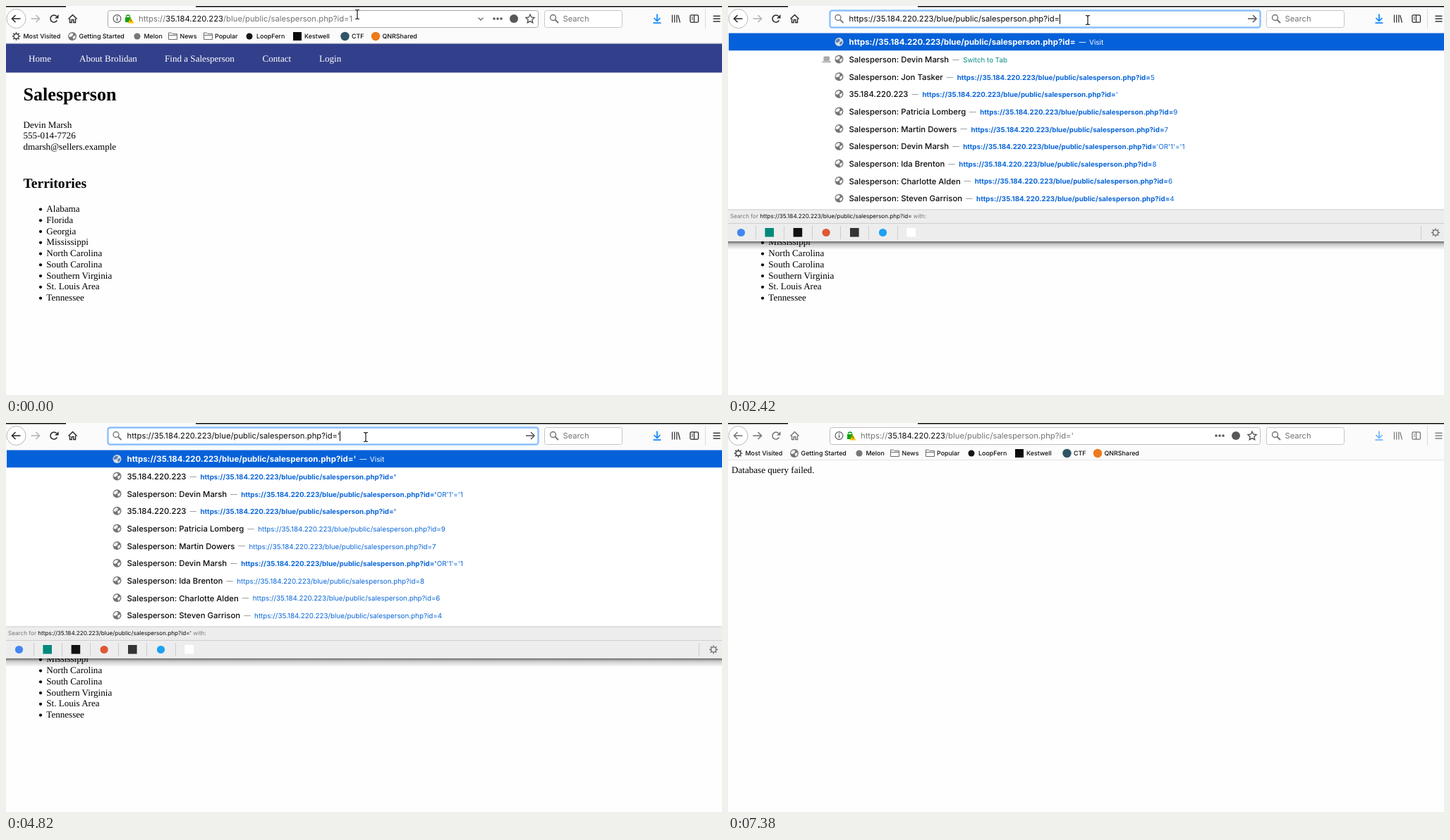
An HTML page with a canvas that plays this animation: 1015x552 px, repeating every 7.48 s.

```html
<!DOCTYPE html>
<html lang="en">
<head>
<meta charset="utf-8">
<title>Address bar</title>
<style>
html, body { margin: 0; width: 100%; height: 100%; overflow: hidden; background: #fefefe; }
canvas { display: block; width: 1015px; height: 552px; }
</style>
</head>
<body>
<canvas id="stage"></canvas>
<script>
const W = 1015, H = 552, LOOP = 7480;
const canvas = document.getElementById('stage');
const ctx = canvas.getContext('2d');
const dpr = window.devicePixelRatio || 1;
canvas.width = W * dpr;
canvas.height = H * dpr;

const SANS = 'Inter, "Open Sans", sans-serif';
const SERIF = '"Liberation Serif", "Times New Roman", serif';
const HOST = '35.184.220.223';
const PATH = '/blue/public/salesperson.php?id=';
const BASE = 'https://' + HOST + PATH;
const INK = '#2b2b2f', GREY = '#737373', LINK = '#0a66d8';
const SELLER = 'Devin Marsh';
const AREAS = ['Alabama', 'Florida', 'Georgia', 'Mississippi', 'North Carolina',
  'South Carolina', 'Southern Virginia', 'St. Louis Area', 'Tennessee'];
const INJECT = "'OR'1'='1";

// Each step changes part of the running state
const steps = [
  [0, { mode: 'view', q: '1', page: 'seller', hover: true, cur: [498, 12], popup: false, caret: false, selected: false, loading: false, active: true }],
  [150, { cur: [498, 16] }],
  [470, { cur: [502, 18] }],
  [620, { cur: [507, 19] }],
  [770, { cur: [510, 20] }],
  [920, { mode: 'focus', selected: true }],
  [1820, { selected: false, caret: true }],
  [2270, { mode: 'type', q: '' }],
  [2420, { popup: true }],
  [2720, { caret: false }],
  [3170, { q: '[', caret: true }],
  [3320, { q: "['" }],
  [3770, { q: '[', popup: false }],
  [3920, { popup: true }],
  [4070, { q: '', popup: false }],
  [4220, { popup: true }],
  [4520, { caret: false }],
  [4820, { q: "'", caret: true }],
  [5110, { popup: false }],
  [5290, { mode: 'load', caret: false, loading: true }],
  [5820, { mode: 'view', page: 'failed' }],
  [6050, { loading: false }],
  [6200, { hover: false, cur: [532, 58] }],
  [6350, { cur: [640, 176] }],
  [6500, { cur: [778, 326] }],
  [6650, { cur: [885, 438] }],
  [6790, { cur: [949, 504] }],
  [6940, { cur: null }],
  [7380, { active: false }]
];

function stateAt(t) {
  const s = {};
  for (const [at, patch] of steps) if (at <= t) Object.assign(s, patch);
  return s;
}

// Drawing helpers
function text(str, x, y, size, color, weight = 400, family = SANS) {
  ctx.font = `${weight} ${size}px ${family}`;
  ctx.fillStyle = color;
  ctx.fillText(str, x, y);
  return x + ctx.measureText(str).width;
}
function rect(x, y, w, h, color) {
  ctx.fillStyle = color;
  ctx.fillRect(x, y, w, h);
}
function box(x, y, w, h, r, fill, stroke, lw = 1) {
  ctx.beginPath();
  ctx.roundRect(x, y, w, h, r);
  if (fill) { ctx.fillStyle = fill; ctx.fill(); }
  if (stroke) { ctx.strokeStyle = stroke; ctx.lineWidth = lw; ctx.stroke(); }
}
function disc(x, y, r, color) {
  ctx.beginPath();
  ctx.arc(x, y, r, 0, 7);
  ctx.fillStyle = color;
  ctx.fill();
}
function ring(x, y, r, color, lw = 1, from = 0, to = Math.PI * 2) {
  ctx.beginPath();
  ctx.arc(x, y, r, from, to);
  ctx.strokeStyle = color;
  ctx.lineWidth = lw;
  ctx.stroke();
}
function path(pts, color, lw, closed) {
  ctx.beginPath();
  for (let i = 0; i < pts.length; i += 2) ctx.lineTo(pts[i], pts[i + 1]);
  if (closed) ctx.closePath();
  ctx.strokeStyle = color;
  ctx.lineWidth = lw;
  ctx.stroke();
}
function shape(pts, color) {
  ctx.beginPath();
  for (let i = 0; i < pts.length; i += 2) ctx.lineTo(pts[i], pts[i + 1]);
  ctx.fillStyle = color;
  ctx.fill();
}

// Icons
function arrow(x, y, dir, color, half = 6, lw = 1.6) {
  const tip = x + dir * half;
  path([x - dir * half, y, tip, y], color, lw);
  path([tip - dir * 5, y - 5, tip, y, tip - dir * 5, y + 5], color, lw);
}
function lens(x, y, color) {
  ring(x - 1.5, y - 1.5, 4, color, 1.4);
  path([x + 1.5, y + 1.5, x + 6, y + 6], color, 1.8);
}
function gear(x, y, r, color) {
  ring(x, y, r * 0.6, color, 1.4);
  for (let i = 0; i < 8; i++) {
    const c = Math.cos(i * Math.PI / 4), s = Math.sin(i * Math.PI / 4);
    path([x + c * r * 0.7, y + s * r * 0.7, x + c * r, y + s * r], color, 1.5);
  }
}
function globe(x, y, color = '#747477', land = '#f2f2f2') {
  disc(x, y, 6, color);
  shape([x - 4.5, y - 2.5, x - 1, y - 4.8, x + 1.5, y - 3.5, x + 0.5, y - 1, x - 2, y + 1, x - 5, y + 0.5], land);
  shape([x + 0.5, y + 0.5, x + 4.8, y - 1.5, x + 4, y + 2.5, x + 1.5, y + 4.6], land);
}
function folder(x, y) {
  path([x, y - 4.5, x + 4, y - 4.5, x + 5.5, y - 3, x + 12, y - 3, x + 12, y + 5, x, y + 5], '#6b6b6e', 1, true);
  path([x, y - 1, x + 12, y - 1], '#6b6b6e', 1);
}
function star(x, y, r, color) {
  const pts = [];
  for (let i = 0; i < 10; i++) {
    const a = i * Math.PI / 5 - Math.PI / 2, d = i % 2 ? r * 0.48 : r;
    pts.push(x + Math.cos(a) * d, y + Math.sin(a) * d);
  }
  path(pts, color, 1.3, true);
}
function home(x, y, color) {
  path([x - 6, y + 0.5, x, y - 5.5, x + 6, y + 0.5], color, 1.5);
  path([x - 4, y, x - 4, y + 5.5, x - 1.3, y + 5.5, x - 1.3, y + 1.5, x + 1.3, y + 1.5, x + 1.3, y + 5.5, x + 4, y + 5.5, x + 4, y], color, 1.4);
}
function reload(x, y, color, busy) {
  if (busy) return ring(x, y, 5, color, 1.6, 2.1, 7.3);
  ring(x, y, 5, color, 1.6, 0.5, 5.5);
  shape([x + 6.5, y - 6, x + 6.5, y - 0.5, x + 1, y - 0.5], color);
}
function padlock() {
  ring(173, 15.5, 2.6, '#12a312', 1.5, Math.PI, Math.PI * 2);
  rect(169, 16, 8, 7, '#12a312');
  shape([177, 16.5, 181.5, 24.5, 172.5, 24.5], '#fdc50b');
  rect(176.6, 19, 1, 3, '#4a3a00');
}

function page(s) {
  rect(0, 53, W, H - 53, '#fefefe');
  if (s.page === 'failed') {
    text('Database query failed.', 5, 71.2, 13.1, '#000', 400, SERIF);
    return;
  }
  rect(0, 53.5, W, 41, '#32408b');
  const nav = { 'Home': 32, 'About Brolidan': 104, 'Find a Salesperson': 225, 'Contact': 363.5, 'Login': 444 };
  for (const label in nav) text(label, nav[label], 78.5, 13.1, '#fff', 400, SERIF);
  text('Salesperson', 24.5, 134.3, 26.1, '#000', 700, SERIF);
  [SELLER, '555-014-7726', 'dmarsh@sellers.example'].forEach((line, i) =>
    text(line, 24.5, 172.5 + i * 15.8, 13.1, '#000', 400, SERIF));
  text('Territories', 24.5, 257.6, 19.6, '#000', 700, SERIF);
  AREAS.forEach((name, i) => {
    const y = 292.2 + i * 15.75;
    disc(49, y - 3.6, 2.1, '#000');
    text(name, 57.3, y, 13.1, '#000', 400, SERIF);
  });
}

function bookmarks() {
  rect(0, 52, W, 1, '#e4e4e5');
  gear(14.5, 43, 5.8, '#3c3c40');
  globe(94, 43);
  disc(186, 43, 4.6, '#77777a');
  folder(230.5, 42.5);
  folder(280.5, 42.5);
  disc(345, 43, 4.5, '#151515');
  rect(407, 37, 12, 12, '#0a0a0a');
  disc(480.5, 43, 6.2, '#2e5566');
  disc(524, 43, 6.2, '#ee7a1a');
  const marks = { 'Most Visited': 24.5, 'Getting Started': 103.5, 'Melon': 195.5, 'News': 246.5, 'Popular': 296,
    'LoopFern': 355, 'Kestwell': 423, 'CTF': 490, 'QNRShared': 533.5 };
  for (const label in marks) text(label, marks[label], 46.3, 8.9, '#0c0c0d', 500);
}

function address(s) {
  const typing = s.mode === 'type', focused = typing || s.mode === 'focus';
  box(144.5, 6.5, 610, 24, 3, '#fff', s.hover ? '#a9a9ab' : '#bebec0');
  if (focused) box(144.5, 6.5, 610, 24, 3, null, '#8cc0fb', 2.4);

  const withId = s.mode === 'view' || s.mode === 'focus';
  const x = withId ? 188 : 171.5, y = 22.4, size = 11.28;
  if (withId) {
    ring(157.5, 18, 5.4, '#4f4f53', 1.1);
    rect(156.9, 17, 1.3, 4, '#4f4f53');
    rect(156.9, 14.7, 1.3, 1.3, '#4f4f53');
    padlock();
    if (s.hover) path([669.5, 16.5, 673, 20, 676.5, 16.5], '#6a6a6d', 1.3);
    for (let i = -1; i < 2; i++) disc(697 + i * 5, 18, 1.8, '#58585b');
    disc(720, 18, 6, '#58585b');
    star(743, 18.5, 6.4, '#4d4d50');
  } else {
    lens(157.5, 18, '#77777a');
    if (typing) arrow(743, 18, 1, '#5a5a5d');
  }

  if (focused) {
    ctx.font = `400 ${size}px ${SANS}`;
    if (s.selected) rect(x, 11, ctx.measureText(BASE + s.q).width + 0.5, 15, '#b2d5fd');
    const end = text(BASE + s.q, x, y, size, '#0c0c0d');
    if (s.caret) rect(Math.round(end), 11.5, 1, 14, '#000');
  } else {
    let end = text('https://', x, y, size, GREY);
    end = text(HOST, end, y, size, '#0c0c0d');
    text(PATH + s.q, end, y, size, GREY);
  }
}

function toolbar(s) {
  rect(0, 0, W, 53, '#fbfbfb');
  rect(0, 0, 85, 1.5, '#0c0c0d');
  rect(269, 0, W - 269, 1.5, '#0c0c0d');
  const ink = s.active ? INK : '#77777a';
  disc(14.5, 18, 13.5, '#fff');
  ring(14.5, 18, 13.5, '#b9b9bb', 1);
  arrow(14.5, 18, -1, ink);
  arrow(41.5, 18, 1, s.active ? '#b5b5b7' : '#77777a');
  reload(68, 18, ink, s.loading);
  home(94.5, 18, ink);
  address(s);
  box(763.5, 6.5, 110, 24, 3, '#fff', '#c6c6c8');
  lens(777, 18, '#6f6f72');
  text('Search', 789.5, 22.4, 11.2, '#757578');

  const blue = s.active ? '#0a84ff' : '#6cb4ff';
  path([923, 11.5, 923, 21], blue, 1.7);
  path([918.5, 17, 923, 21.3, 927.5, 17], blue, 1.7);
  path([917.5, 24, 928.5, 24], blue, 1.7);
  for (let i = 0; i < 3; i++) path([944.5 + i * 3.2, 12.5, 944.5 + i * 3.2, 23.5], ink, 1.2);
  path([952.8, 13, 955.5, 23.5], ink, 1.2);
  box(970, 12.8, 11.5, 10.4, 1.5, null, ink, 1.3);
  path([975.5, 13, 975.5, 23], ink, 1.2);
  path([972, 16, 974, 16], ink, 1);
  path([972, 18.5, 974, 18.5], ink, 1);
  rect(991, 4, 1, 28, '#dcdcde');
  for (let i = -1; i < 2; i++) rect(1002.5, 17.4 + i * 3.8, 10, 1.4, ink);
}

function suggestions(q) {
  const rows = [['Patricia Lomberg', '9'], ['Martin Dowers', '7'], [SELLER, INJECT],
    ['Ida Brenton', '8'], ['Charlotte Alden', '6'], ['Steven Garrison', '4']];
  const top = q === "'" ? [[HOST, "'"], [SELLER, INJECT]] : [[SELLER, null], ['Jon Tasker', '5']];
  return [...top, [HOST, "'"], ...rows];
}

function popup(q) {
  const typed = BASE + q;
  const shade = ctx.createLinearGradient(0, 334, 0, 346);
  shade.addColorStop(0, 'rgba(0,0,0,.58)');
  shade.addColorStop(0.35, 'rgba(0,0,0,.2)');
  shade.addColorStop(1, 'rgba(0,0,0,0)');
  rect(0, 334, W, 12, shade);
  rect(0, 32, W, 6, '#fbfbfb');
  rect(0, 38, W, 251, '#fff');

  rect(1, 38.5, W - 1, 24.7, '#0561d9');
  globe(157.5, 51, '#d8dde6', '#5f7fae');
  let end = text(typed, 171.5, 55.2, 11.47, '#fff', 700);
  rect(end + 5, 51, 10, 1, '#cfe0f8');
  text('Visit', end + 19.5, 55, 10, '#fff');

  suggestions(q).forEach(([who, id], i) => {
    const y = 75.9 + i * 24.63;
    globe(157.5, y - 0.3);
    end = text(who === HOST ? who : 'Salesperson: ' + who, 171.5, y + 4.2, 11.35, '#0c0c0d', 500);
    rect(end + 5, Math.round(y), 9.5, 1, '#a0a0a2');
    const x = end + 20, base = y + 4.1;
    if (id === null) {
      box(135.5, y - 4.5, 8.5, 6.5, 1, '#aaaaac');
      rect(133.5, y + 2.5, 12.5, 1.8, '#aaaaac');
      text('Switch to Tab', x, base, 9.8, '#058b80');
      return;
    }
    const url = BASE + id;
    const match = url.startsWith(typed) ? typed.length : 0;
    const mid = match ? text(url.slice(0, match), x, base, 9.8, LINK, 700) : x;
    text(url.slice(match), mid, base, 9.8, LINK);
  });

  rect(0, 288.5, W, 45.5, '#ededee');
  rect(0, 288.5, W, 1, '#cfcfd1');
  rect(0, 308, W, 1, '#cfcfd1');
  end = text('Search for ', 3, 301.3, 8.15, '#77777a');
  end = text(typed, end, 301.3, 8.15, '#0c0c0d');
  text(' with:', end, 301.3, 8.15, '#77777a');

  ['#4285f4', '#00897b', '#111', '#de5833', '#333', '#1da1f2', '#fff'].forEach((color, i) => {
    const x = 18.5 + i * 40.2;
    if (i === 1 || i === 2 || i === 4 || i === 6) rect(x - 6.3, 315, 12.6, 12.6, color);
    else disc(x, 321.5, 5.6, color);
    if (i < 6) rect(Math.round(x + 20), 312, 1, 19, '#cdcdcf');
  });
  rect(982, 312, 1, 19, '#cdcdcf');
  gear(1003, 321.5, 6, '#6a6a6d');
}

function cursor([x, y]) {
  if (y > 32) {
    const pts = [0, 0, 0, 12, 2.8, 9.4, 4.8, 14, 6.8, 13.1, 4.9, 8.7, 8.6, 8.7].map((v, i) => v + (i % 2 ? y : x));
    shape(pts, '#000');
    path(pts, '#fff', 0.8, true);
    return;
  }
  for (const [color, lw] of [['#fff', 2.6], ['#1a1a1a', 1.2]]) {
    path([x, y - 5.5, x, y + 5.5], color, lw);
    path([x - 3, y - 6.5, x - 1, y - 6.3, x, y - 5.3, x + 1, y - 6.3, x + 3, y - 6.5], color, lw);
    path([x - 3, y + 6.5, x - 1, y + 6.3, x, y + 5.3, x + 1, y + 6.3, x + 3, y + 6.5], color, lw);
  }
}

function draw(now) {
  const s = stateAt(now % LOOP);
  ctx.setTransform(dpr, 0, 0, dpr, 0, 0);
  ctx.textRendering = 'geometricPrecision';
  ctx.textBaseline = 'alphabetic';
  page(s);
  toolbar(s);
  bookmarks();
  if (s.popup) popup(s.q);
  if (s.cur) cursor(s.cur);
}

const start = performance.now();
function tick() {
  draw(performance.now() - start);
  requestAnimationFrame(tick);
}
tick();
</script>
</body>
</html>
```
